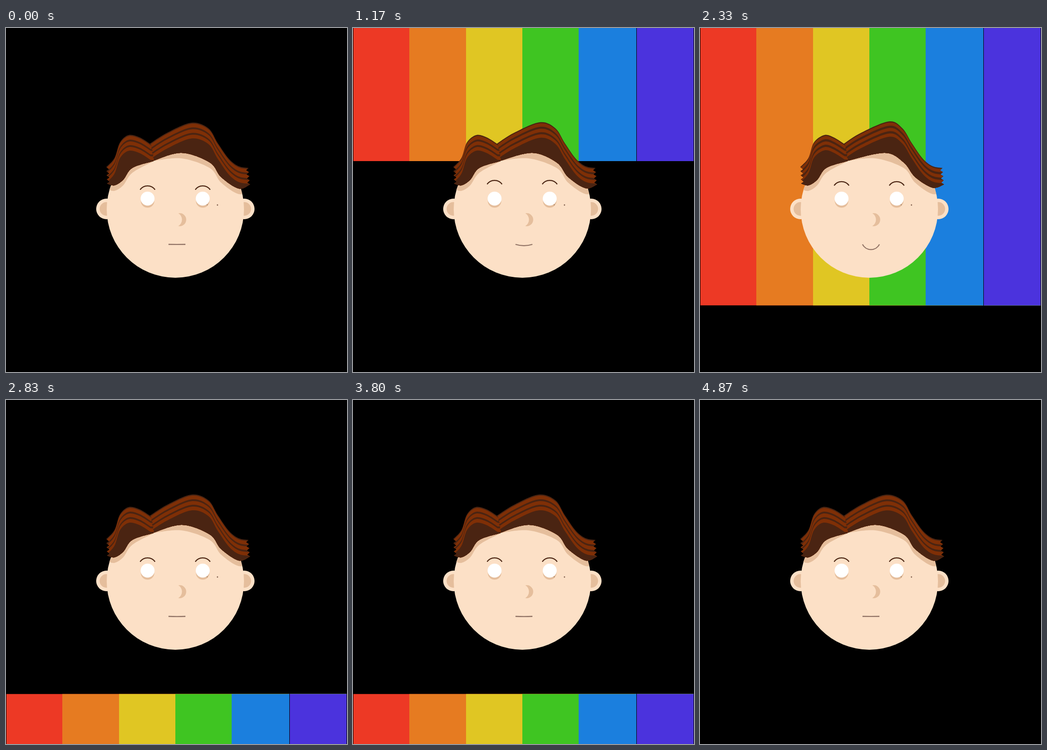
Animation of 745x752 px, one loop 4910 ms. Source, as an HTML page with a canvas:

```html
<!DOCTYPE html>
<html lang="en">
<head>
<meta charset="utf-8">
<title>Rainbow face</title>
<style>
html, body { margin: 0; width: 100%; height: 100%; overflow: hidden; background: #000; }
canvas { display: block; }
</style>
</head>
<body>
<canvas id="stage" width="745" height="752"></canvas>
<script>
const ctx = document.getElementById('stage').getContext('2d');
const W = 745, H = 752, LOOP = 4910, STEP = 33.35, CYCLE = 29, CYCLES = 5;
const SKIN = '#fce0c6', SHADE = '#e5be9c', DARK = '#4a2412', BROWN = '#7f2f06';
const COLORS = ['#ed3925', '#e67b21', '#e0c623', '#3fc522', '#1b7fde', '#4b33dd'];
const STRIPE = 123.3, PART = 320;

const lerp = (a, b, k) => a + (b - a) * k;
const last = list => list[list.length - 1];

// Key points of the hair; the crests lean right as sway goes from 0 to 1
const hair = sway => ({
  right: {
    top: [[314, 253], [352, 229], [405 + 8 * sway, 207 - 3 * sway], [442, 219],
      [463, 252], [487, 286], [508, 302], [530, 306]],
    bottom: [[533, 342], [508, 351 - 2 * sway], [470, 326], [445, 294],
      [383 + 22 * sway, 273], [PART, 291]]
  },
  left: {
    top: [[316, 254], [292, 239], [268 + 4 * sway, 234], [249, 250], [237, 284], [219, 304]],
    bottom: [[221, 340], [237, 344], [256, 332], [276, 306], [PART + 2, 291]]
  }
});

// Smooth curve through all points
function spline(path, pts, join = false) {
  path[join ? 'lineTo' : 'moveTo'](...pts[0]);
  for (let i = 1; i < pts.length; i++) {
    const a = pts[i - 1], b = pts[i];
    const before = pts[i - 2] || a, after = pts[i + 1] || b;
    path.bezierCurveTo(
      a[0] + (b[0] - before[0]) / 6, a[1] + (b[1] - before[1]) / 6,
      b[0] - (after[0] - a[0]) / 6, b[1] - (after[1] - a[1]) / 6, ...b);
  }
}

function zigzag(path, [x0, y0], [x1, y1], depth, teeth = 4) {
  for (let i = 0; i < teeth; i++) {
    const notch = (i + 0.55) / teeth, tip = (i + 1) / teeth;
    path.lineTo(lerp(x0, x1, notch) + depth, lerp(y0, y1, notch));
    path.lineTo(lerp(x0, x1, tip), lerp(y0, y1, tip));
  }
}

function fill(path, color) {
  ctx.fillStyle = color;
  ctx.fill(path);
}

function circle(x, y, r) {
  const path = new Path2D();
  path.arc(x, y, r, 0, Math.PI * 2);
  return path;
}

const disc = (x, y, r, color) => fill(circle(x, y, r), color);

function line(d, color) {
  ctx.strokeStyle = color;
  ctx.lineWidth = 2.3;
  ctx.stroke(new Path2D(d));
}

function lobe({ top, bottom }, side, sway) {
  const shape = new Path2D();
  spline(shape, top);
  zigzag(shape, last(top), bottom[0], -6 * side);
  spline(shape, bottom, true);
  zigzag(shape, last(bottom), top[0], 2);
  shape.closePath();
  fill(shape, DARK);

  const layer = (drop, color) => {
    const path = new Path2D(), edge = top.map(([x, y]) => [x, y + drop]);
    const inner = PART - 15 * side, outer = last(top)[0] + 15 * side;
    spline(path, edge);
    path.lineTo(outer, last(edge)[1]);
    path.lineTo(outer, 400);
    path.lineTo(inner, 400);
    path.lineTo(inner, edge[0][1]);
    fill(path, color);
  };
  ctx.save();
  ctx.clip(shape);
  for (let k = 0; k < 3; k++) {
    const drop = 2.5 + 12 * k;
    layer(drop, BROWN);
    layer(drop + 8 - sway, DARK);
  }
  ctx.restore();
}

// The shadow fades out towards the parting
function shadow({ bottom }, side) {
  const path = new Path2D();
  spline(path, bottom.map(([x, y]) => [x, y + 12 * Math.min(1, Math.abs(x - PART) / 50)]));
  path.lineTo(PART, 250);
  path.lineTo(PART + 220 * side, 250);
  fill(path, SHADE);
}

function rainbow(step) {
  const top = 52.56 * step - 24.4 - H;
  COLORS.forEach((color, i) => {
    const x = Math.round(i * STRIPE);
    ctx.fillStyle = color;
    ctx.fillRect(x, top, W - 1 - x, H);
  });
  // hairline gaps at the left edge and before the last stripe
  ctx.fillStyle = '#000';
  ctx.fillRect(0, 0, 1, H);
  ctx.fillStyle = COLORS[4];
  ctx.fillRect(616, top, 3, H);
  ctx.fillStyle = '#000';
  ctx.fillRect(619, 0, 1, H);
}

function head(locks) {
  const face = circle(370, 396, 150);
  for (const side of [-1, 1]) {
    disc(370 + 150.5 * side, 395.5, 22.5, SKIN);
    disc(370 + 150.5 * side, 395.5, 15, SHADE);
  }
  fill(face, SKIN);
  ctx.save();
  ctx.clip(face);
  shadow(locks.right, 1);
  shadow(locks.left, -1);
  ctx.restore();
}

function features(brow, smile) {
  for (const x of [309.3, 429.8]) {
    disc(x, 378, 14.8, SHADE);
    disc(x, 373, 15.2, '#fff');
    line(`M${x - 16.3} ${353.5 - brow}a20 20 0 0 1 32.6 0`, DARK);
  }
  disc(462, 387, 1.4, '#7b5a48');
  disc(439.5, 386.5, 1.1, '#8d6c58');
  fill(new Path2D('M376.5 405A14.3 14.3 0 1 1 376.5 433A16.3 16.3 0 0 0 376.5 405Z'), SHADE);

  const half = 18.5, depth = Math.max(smile, 0.1);
  const r = (half * half + depth * depth) / (2 * depth);
  line(`M355 473A${r} ${r} 0 0 0 ${355 + 2 * half} 473`, '#907264');
}

function draw(step) {
  const p = step / CYCLE;
  const sway = (1 - Math.cos(p * Math.PI * 2)) / 2;
  const brow = 13 * Math.sin(Math.min(p / 0.55, 1) * Math.PI);
  const smile = 16.5 * (1 - Math.abs(2 * p - 1)) ** 2;
  const locks = hair(sway);

  ctx.fillStyle = '#000';
  ctx.fillRect(0, 0, W, H);
  rainbow(step);
  head(hair(0));
  lobe(locks.right, 1, sway);
  lobe(locks.left, -1, sway);
  features(brow, smile);
}

const start = performance.now();
function tick() {
  const t = Math.max(performance.now() - start, 0) % LOOP;
  const step = Math.min(Math.floor((t + 6) / STEP), CYCLES * CYCLE);
  draw(step % CYCLE);
  requestAnimationFrame(tick);
}
tick();
</script>
</body>
</html>
```
